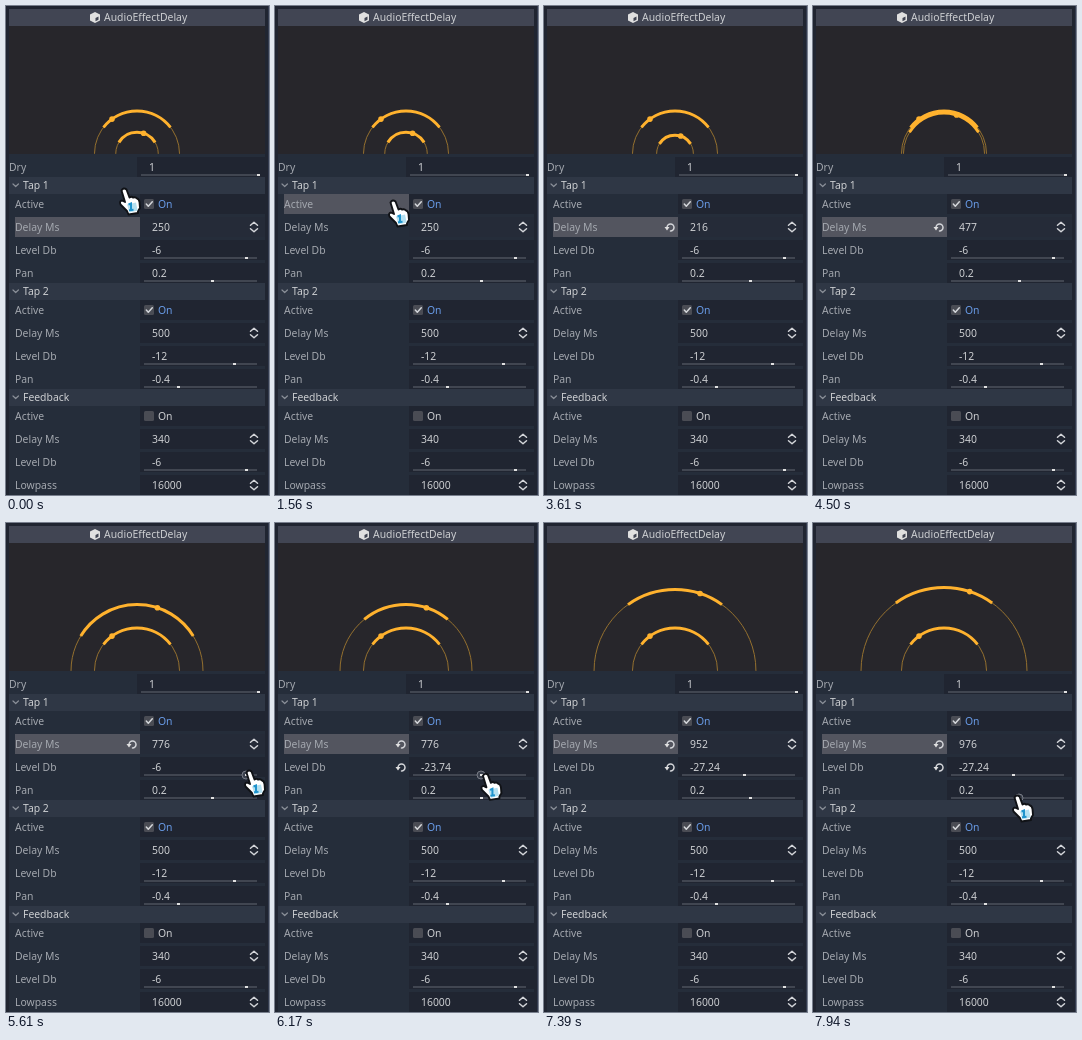
Animation, 263 px wide and 489 px high, one loop 8000 ms. Source, as an HTML page:

```html
<!DOCTYPE html>
<html lang="en">
<head>
<meta charset="utf-8">
<title>Delay inspector</title>
<style>
  html, body { margin: 0; width: 100%; height: 100%; overflow: hidden; background: #202531; }
  svg { display: block; width: 263px; height: 489px; }
  text { font: 10.4px "Noto Sans", "Open Sans", sans-serif; fill: #cdcfd2; white-space: pre; }
  .name { fill: #a4a8af; }
  .on { fill: #699ce8; }
  .line { fill: none; stroke: #d4d6da; stroke-width: 1.5; stroke-linecap: round; stroke-linejoin: round; }
  .fold { stroke: #8b9099; stroke-width: 1.2; }
  .thin { fill: none; stroke: #94702f; }
  .thick { fill: none; stroke: #ffb22e; stroke-width: 3; }
  .dot { fill: #ffb22e; }
</style>
</head>
<body>
<svg viewBox="0 0 263 489">
  <defs><clipPath id="view"><path d="M3 20H259V148H3z"/></clipPath></defs>
  <path fill="#252d3a" d="M3 148H259V489H3z"/>
  <path fill="#333b4f" d="M262 0h1V489h-1z"/>
  <path fill="#414553" d="M3 3H259V20H3z"/>
  <path fill="#27262b" d="M3 20H259V148H3z"/>
  <path fill="#e0e0e0" d="M89 6l5 2.600v5.800l-5 2.600l-5-2.600V8.600z"/>
  <path fill="#414553" d="M89.500 12l3-1.500v3.200l-3 1.600z"/>
  <text x="98" y="15">AudioEffectDelay</text>
  <g id="rings" clip-path="url(#view)"></g>
  <g id="rows"></g>
  <g id="cursor">
    <path fill="#fff" stroke="#101216" stroke-width="1.900" stroke-linejoin="round"
      d="M2.500 3.500Q4.500 0 7.500 2.500L10.500 10.500Q12.500 9 14 10.500Q16.500 9.500 18 11.500Q20 12 20.500 15L21 21L19 24V26L9.500 27.500L8 24L1.500 17.500Q0 14 3 13.500L6 15z"/>
    <path fill="#b5e0f0" d="M8 17.500l9-2l1.500 8l-8 2z"/>
    <path fill="none" stroke="#1f93cc" stroke-width="2" d="M9.500 17.500l2.500-1v6.500M10 23.300l4.500-.5"/>
  </g>
</svg>
<script>
const LOOP = 8000;
const CENTER = { x: 131, y: 147.5 };
const TRACK = { x: 138, width: 113 };
const LIGHT = '#e0e0e0';
const byId = id => document.getElementById(id);
const rows = byId('rows');

const set = (el, attrs) => { for (const key in attrs) el.setAttribute(key, attrs[key]); };
const show = (el, on) => el.setAttribute('visibility', on ? 'visible' : 'hidden');

function add(parent, tag, attrs, text) {
  const el = document.createElementNS('http://www.w3.org/2000/svg', tag);
  set(el, attrs);
  if (text !== undefined) el.textContent = text;
  parent.append(el);
  return el;
}
const box = (x, y, width, height, fill, rx = 0) => add(rows, 'rect', { x, y, width, height, fill, rx });
const label = (x, y, text, type = '') => add(rows, 'text', { x, y: y + 4, class: type }, text);
const line = (d, type = '') => add(rows, 'path', { d, class: `line ${type}` });

function revertIcon(y) {
  const group = add(rows, 'g', {});
  add(group, 'path', { class: 'line', d: `M123 ${y + 0.5}a3.500 3.500 0 1 1 3.500 3.500` });
  add(group, 'path', { fill: LIGHT, d: `M120.500 ${y}h5l-2.500 3.500z` });
  return group;
}

function field(name, y, value) {
  const well = box(134, y - 10, 125, 20, '#202531');
  const back = box(9, y - 10, 125, 20, '#53555f');
  show(back, false);
  label(9, y, name, 'name');
  return { well, back, value: label(146, y, value) };
}

function spinner(name, y, value) {
  const part = field(name, y, value);
  line(`M244.500 ${y - 1.7}l3.500-3l3.500 3M244.500 ${y + 1.7}l3.500 3l3.500-3`);
  return part;
}

function slider(name, y, value, ratio) {
  const part = field(name, y, value);
  box(TRACK.x, y + 7, TRACK.width, 2, '#414651');
  part.halo = add(rows, 'circle', { cy: y + 8, r: 4, fill: '#3a404d', stroke: '#777b85' });
  part.knob = box(0, y + 7, 3, 2, LIGHT);
  part.place = r => {
    const x = Math.round(TRACK.x + TRACK.width * r);
    set(part.knob, { x: x - 1 });
    set(part.halo, { cx: x });
  };
  part.place(ratio);
  show(part.halo, false);
  return part;
}

function toggle(y, checked) {
  const part = field('Active', y, 'On');
  set(part.value, { x: 152 });
  box(138, y - 5, 10, 10, '#4a4c54', 1.5);
  const tick = line(`M140.300 ${y}l2 2.200l4-4.400`);
  part.check = on => {
    set(part.value, { class: on ? 'on' : '' });
    show(tick, on);
  };
  part.check(checked);
  return part;
}

const levelRatio = db => (db + 60) / 60;

function tap(name, y, on, delay, db, pan) {
  box(3, y - 8, 256, 17, '#2f3745');
  line(`M7 ${y - 1}l2.700 2.500l2.700-2.500`, 'fold');
  label(17, y, name);
  const part = {
    active: toggle(y + 19, on),
    delay: spinner('Delay Ms', y + 42, delay),
    level: slider('Level Db', y + 65, db, levelRatio(db))
  };
  if (pan !== undefined) part.pan = slider('Pan', y + 88, pan, (pan + 1) / 2);
  return part;
}

box(131, 151, 128, 20, '#202531');
label(3, 161, 'Dry', 'name');
label(143, 161, '1');
box(135, 168, 118, 2, '#414651');
box(251, 168, 3, 2, LIGHT);
const tap1 = tap('Tap 1', 179, true, 250, -6, 0.2);
tap('Tap 2', 285, true, 500, -12, -0.4);
tap('Feedback', 391, false, 340, -6);
spinner('Lowpass', 479, 16000);
set(tap1.delay.well, { fill: '#252b38' });
const delayRevert = revertIcon(221);
const levelRevert = revertIcon(244);

// Each ring shows delay as radius, level as arc length and pan as dot angle.
function ring() {
  const group = add(byId('rings'), 'g', {});
  const thin = add(group, 'circle', { class: 'thin', cx: CENTER.x, cy: CENTER.y });
  const thick = add(group, 'path', { class: 'thick' });
  const dot = add(group, 'circle', { class: 'dot', r: 2.8 });
  return (delay, db, pan, visible = true) => {
    const r = delay * 0.085;
    const point = deg => {
      const a = deg * Math.PI / 180;
      return [CENTER.x + r * Math.sin(a), CENTER.y - r * Math.cos(a)];
    };
    const span = 65 * levelRatio(db);
    const [cx, cy] = point(pan * 90);
    set(thin, { r });
    set(thick, { d: `M${point(-span)}A${r} ${r} 0 0 1 ${point(span)}` });
    set(dot, { cx, cy });
    show(group, visible);
  };
}
const ring1 = ring();
ring()(500, -12, -0.4);

const within = (t, from, to) => t >= from && t < to;
const ramp = (t, from, to) => Math.min(1, Math.max(0, (t - from) / (to - from)));

function cursorAt(t) {
  let x = 113, y = 181;
  const move = (from, to, toX, toY) => {
    const p = ramp(t, from, to);
    x += (toX - x) * p;
    y += (toY - y) * p;
  };
  move(60, 220, 100, 189);
  move(940, 1280, 105, 195);
  move(1440, 1560, 113, 193);
  move(1580, 1890, 151, 190);
  move(2600, 3170, 222, 226);
  move(5050, 5600, 238, 246);
  move(5720, 6260, 199, 250);
  move(6400, 6830, 199, 220);
  move(7550, 7940, 199, 271);
  return `translate(${x} ${y})`;
}

function render(t) {
  const delay = Math.round(250 - 34 * ramp(t, 3390, 3610) + 260 * ramp(t, 4060, 4500)
    + 300 * ramp(t, 4500, 4890) + 200 * ramp(t, 6960, 7450));
  const db = Math.round(-600 - 2124 * ramp(t, 5720, 6260)) / 100;
  const on = !within(t, 2280, 2500);
  const activeSelected = within(t, 1500, 3340);
  const dragging = within(t, 3340, 4950) || within(t, 6940, 7490);

  tap1.active.check(on);
  tap1.delay.value.textContent = delay;
  tap1.level.value.textContent = db;
  tap1.level.place(levelRatio(db));
  show(tap1.level.halo, within(t, 5450, 6420));
  show(tap1.pan.halo, t >= 7890);
  show(tap1.active.back, activeSelected);
  show(tap1.delay.back, !activeSelected);
  show(delayRevert, delay !== 250);
  show(levelRevert, db !== -6);
  ring1(delay, db, 0.2, on);
  set(byId('cursor'), { transform: cursorAt(t) });
  show(byId('cursor'), !dragging);
}

const start = performance.now();
function tick() {
  render((performance.now() - start) % LOOP);
  requestAnimationFrame(tick);
}
tick();
</script>
</body>
</html>
```
